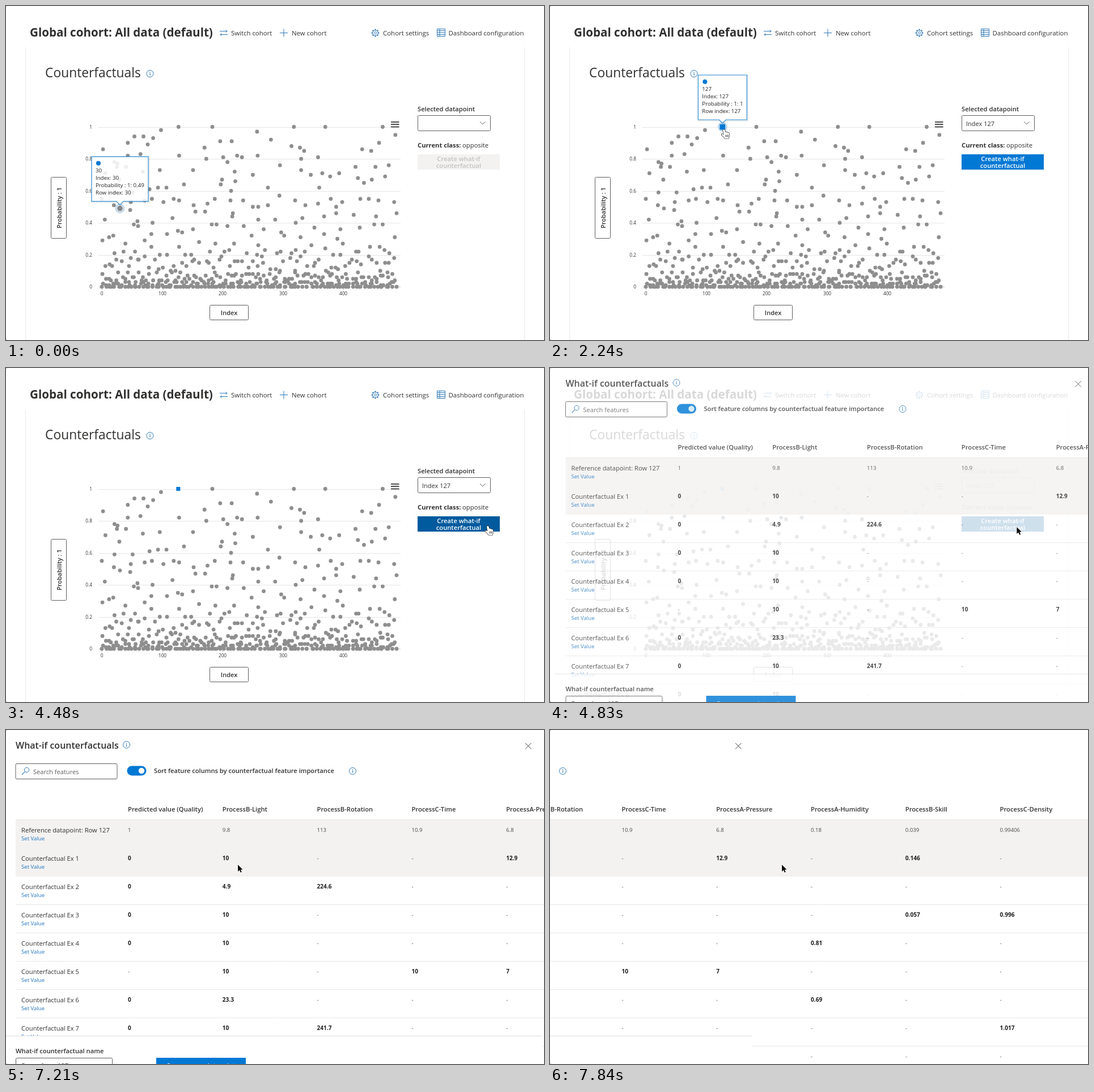
An HTML page with a canvas that plays this animation: 949 by 590 pixels, repeating every 8000 ms.

```html
<!DOCTYPE html>
<html lang="en">
<head>
<meta charset="utf-8">
<title>Counterfactuals</title>
<style>
html, body { margin: 0; width: 100%; height: 100%; overflow: hidden; background: #fff; }
canvas { display: block; width: 949px; height: 590px; }
</style>
</head>
<body>
<canvas id="stage" width="949" height="590"></canvas>
<script>
const ctx = document.getElementById('stage').getContext('2d');
const W = 949, H = 590, LOOP = 8000, STEP = 70;
const INK = '#323130', BLUE = '#0078d4', DOT = '#8e8e8e', ICON = '#2f78b7';

// ---------- helpers ----------
const clamp01 = v => Math.max(0, Math.min(1, v));
const plotX = index => 169 + index * 1.0655;
const plotY = p => 496 - p * 282.5;

function track(keys, t) {
  if (t <= keys[0][0]) return keys[0].slice(1);
  for (let i = 1; i < keys.length; i++) {
    const a = keys[i - 1], b = keys[i];
    if (t <= b[0]) {
      const k = (t - a[0]) / (b[0] - a[0]);
      return a.slice(1).map((v, j) => v + (b[j + 1] - v) * k);
    }
  }
  return keys[keys.length - 1].slice(1);
}

function text(str, x, y, size, { weight = 400, color = INK, align = 'left' } = {}) {
  ctx.font = `${weight} ${size}px "Open Sans", "Noto Sans", sans-serif`;
  ctx.fillStyle = color;
  ctx.textAlign = align;
  ctx.fillText(str, x, y);
}

function fill(x, y, w, h, color) {
  ctx.fillStyle = color;
  ctx.fillRect(x, y, w, h);
}

function frame(x, y, w, h, color = '#605e5c', radius = 2) {
  ctx.beginPath();
  ctx.roundRect(x + .5, y + .5, w, h, radius);
  ctx.strokeStyle = color;
  ctx.lineWidth = 1;
  ctx.stroke();
}

function disc(x, y, r, color) {
  ctx.beginPath();
  ctx.arc(x, y, r, 0, Math.PI * 2);
  ctx.fillStyle = color;
  ctx.fill();
}

function ring(x, y, r, color = ICON, width = 1) {
  ctx.beginPath();
  ctx.arc(x, y, r, 0, Math.PI * 2);
  ctx.strokeStyle = color;
  ctx.lineWidth = width;
  ctx.stroke();
}

function stroke(path, color = ICON, width = 1) {
  ctx.strokeStyle = color;
  ctx.lineWidth = width;
  ctx.stroke(new Path2D(path));
}

function infoIcon(x, y) {
  ring(x, y, 6);
  fill(x - .5, y - 1, 1.1, 4.2, ICON);
  fill(x - .6, y - 3.2, 1.3, 1.3, ICON);
}

// ---------- scatter data ----------
// index, percent: the sparse upper part of the cloud
const upper = [
  127,100, 183,100, 318,100, 370,100, 465,100, 98,98, 257,97, 486,95, 54,94, 69,94,
  85,93, 76,89, 43,90, 280,92, 196,91, 215,91, 459,90, 314,88, 328,87, 335,85,
  170,87, 2,86, 431,86, 446,85, 43,82, 64,83, 128,82, 173,80, 201,81, 224,82,
  232,81, 258,82, 330,80, 358,81, 21,78, 26,77, 208,78, 25,75, 40,75, 295,76,
  420,75, 453,75, 475,76, 68,72, 96,73, 151,73, 220,72, 250,70, 330,73, 346,70,
  365,71, 378,69, 393,71, 424,68, 434,65, 447,67, 469,69, 6,71, 29,67, 199,67,
  197,64, 221,66, 136,64, 79,61, 93,62, 107,62, 214,60, 275,62, 360,62, 21,59,
  51,59, 30,49
];
// lowest percent, highest percent, number of points
const bands = [[50, 57, 27], [40, 48, 18], [30, 39, 26], [20, 29, 38],
  [10, 19, 64], [4, 9, 95], [1, 3, 95], [0, 0, 95]];

let seed = 20;
const random = () => (seed = (seed * 16807) % 2147483647) / 2147483647;

const points = [];
for (let i = 0; i < upper.length; i += 2) points.push({ index: upper[i], p: upper[i + 1] / 100 });
for (const [low, high, count] of bands) {
  for (let i = 0; i < count; i++) {
    const index = Math.floor((i + random()) / count * 489);
    points.push({ index, p: (low + Math.floor(random() * (high - low + 1))) / 100 });
  }
}

// ---------- cursor ----------
const cursorPath = [
  [210, 464, 588], [350, 446, 530], [560, 402, 420], [770, 366, 310], [980, 345, 247],
  [1050, 336, 240], [1260, 315, 227], [1540, 307, 222], [1680, 307, 220], [1750, 307, 218],
  [2940, 307, 218], [3010, 345, 228], [3080, 480, 256], [3150, 680, 280], [3220, 797, 286],
  [3290, 846, 294], [3430, 876, 298], [3570, 860, 288], [3710, 850, 279],
  [4690, 850, 279], [4900, 810, 282], [5180, 660, 270], [5460, 529, 252],
  [5600, 450, 242], [5740, 409, 238]
];

function drawCursor(t, x, y) {
  const hand = (t >= 1120 && t < 2990) || (t >= 3150 && t < 4690);
  ctx.save();
  ctx.translate(x, y);
  ctx.lineJoin = 'round';
  const shape = new Path2D(hand
    ? 'M-2 1 Q0 -1 1.4 1 L2.6 5 Q4 4 5 5.4 Q6.6 4.8 7.3 6 Q9 5.8 9.2 7.4 L9.6 11 Q9.4 13 8.2 14.5 L8 16 L1.2 16 L0 14 L-4.6 9.6 Q-4.8 7.8 -2.8 8 L-.6 9.4 Z'
    : 'M0 0 L0 12 L2.8 9.5 L4.9 13.8 L6.9 12.9 L5 8.8 L8.6 8.6 Z');
  ctx.strokeStyle = hand ? '#111' : '#fff';
  ctx.lineWidth = hand ? 1.2 : 1.6;
  ctx.fillStyle = hand ? '#fff' : '#111';
  ctx.stroke(shape);
  ctx.fill(shape);
  if (hand) stroke('M3 9.5V13.5 M5.2 9.5V13.5 M7.3 9.5V13.5', '#111', .8);
  ctx.restore();
}

// ---------- chart page ----------
function drawHeader() {
  text('Global cohort: All data (default)', 42, 54, 20.6, { weight: 700 });
  stroke('M377 44.5H390 M387.5 42L390 44.5L387.5 47 M391 50.5H378 M380.5 48L378 50.5L380.5 53');
  text('Switch cohort', 397, 52, 11.4);
  stroke('M483 47.5H497 M490 40.5V54.5');
  text('New cohort', 504, 52, 11.4);
  for (let i = 0; i < 8; i++) {
    const a = i * Math.PI / 4, c = Math.cos(a), s = Math.sin(a);
    stroke(`M${651.5 + c * 4.8} ${47.5 + s * 4.8}L${651.5 + c * 6.8} ${47.5 + s * 6.8}`, ICON, 2.2);
  }
  ring(651.5, 47.5, 4.8);
  ring(651.5, 47.5, 2);
  text('Cohort settings', 665, 52, 11.45);
  stroke('M760.5 40.5H774.5V53.5H760.5Z M760.5 43.5H774.5 M760.5 47H774.5 M760.5 50.5H774.5 M765 40.5V53.5');
  text('Dashboard configuration', 780.5, 52, 11.45);
  stroke('M34.5 73V590 M914.5 73V590', '#e8e8e8');
  text('Counterfactuals', 69, 126, 22.8, { weight: 500 });
  infoIcon(254, 119.5);
}

function drawAxes() {
  for (let i = 0; i <= 5; i++) {
    const y = Math.round(plotY(i / 5)) + .5;
    stroke(`M163 ${y}H696`, i ? '#e6e6e6' : '#ccd0d8');
    text(String(i / 5), 152, y + 2.8, 8.3, { align: 'right' });
  }
  for (let i = 0; i < 500; i += 100) {
    const x = Math.round(plotX(i)) + .5;
    stroke(`M${x} 496V502`, '#ccd0d8');
    text(String(i), x - .5, 511, 8.3, { align: 'center' });
  }
  frame(79, 302, 27, 108);
  ctx.save();
  ctx.translate(97.5, 356.5);
  ctx.rotate(-Math.PI / 2);
  text('Probability : 1', 0, 0, 11, { weight: 600, align: 'center' });
  ctx.restore();
  frame(359, 528, 68, 26);
  text('Index', 393.5, 546, 11, { weight: 600, align: 'center' });
}

function drawPoints(t) {
  points.forEach(({ index, p }, i) => {
    if (i || t < 2240) disc(plotX(index), plotY(p), 3.4, DOT);
  });
  const first = 1 - clamp01((t - 140) / 280);
  const second = t < 1050 || t >= 3060 ? 0 : clamp01((t - 980) / 210);
  halo(30, .49, first);
  halo(127, 1, second, t >= 2240);
  halo(486, .95, t >= 3060 && t < 3220 ? .6 : 0);
  if (t >= 2240) fill(plotX(127) - 4, plotY(1) - 3.5, 7, 7, BLUE);
}

function halo(index, p, alpha, square) {
  if (!alpha) return;
  const x = plotX(index), y = plotY(p);
  ctx.save();
  ctx.globalAlpha = alpha;
  disc(x, y, 8, square ? '#b5d7f1' : '#d3e1ec');
  ring(x, y, 7.6, '#a9cbe6');
  if (square) fill(x - 4.7, y - 4.5, 9.4, 9.4, BLUE);
  else disc(x, y, 4.7, '#878787');
  ctx.restore();
}

function drawTooltip(index, p, width, alpha, x = plotX(index), y = plotY(p)) {
  if (alpha <= 0) return;
  const left = x - width / 2, top = y - 91.5, bottom = y - 12.5;
  ctx.save();
  ctx.globalAlpha = alpha;
  const box = new Path2D(`M${left} ${top}H${left + width}V${bottom}H${x + 6}L${x} ${bottom + 6}L${x - 6} ${bottom}H${left}Z`);
  ctx.strokeStyle = 'rgba(0,0,0,.07)';
  ctx.lineWidth = 4;
  ctx.translate(1, 1);
  ctx.stroke(box);
  ctx.translate(-1, -1);
  ctx.fillStyle = 'rgba(255,255,255,.86)';
  ctx.fill(box);
  ctx.strokeStyle = '#2f8fd6';
  ctx.lineWidth = 1.2;
  ctx.stroke(box);
  disc(left + 12, top + 11.7, 4, BLUE);
  [index, `Index: ${index}`, `Probability : 1: ${p}`, `Row index: ${index}`]
    .forEach((line, i) => text(String(line), left + 7, top + 27.8 + i * 12.9, 9.7, { color: '#222' }));
  ctx.restore();
}

function drawTooltips(t) {
  drawTooltip(30, .49, 100, 1 - clamp01((t - 140) / 280));
  if (t >= 1050 && t < 3060) drawTooltip(127, 1, 86, clamp01((t - 980) / 210));
  if (t >= 3060) {
    // the box closes a third of the remaining way every 32 ms
    const n = (t - 3060) / 32;
    const x = plotX(486) + (plotX(127) - plotX(486)) * Math.pow(2 / 3, n);
    const y = plotY(.95) + (plotY(1) - plotY(.95)) * Math.pow(.5, n);
    drawTooltip(486, .95, 100, 1 - clamp01((t - 3710) / 140), x, y);
  }
}

function drawSidebar(t, x, y) {
  const selected = t >= 2240;
  for (const top of [204, 208, 212.5]) fill(679, top, 14.5, 2, '#4a4a4a');
  text('Selected datapoint', 726, 185.5, 11.2, { weight: 600 });
  frame(726, 193, 128, 27);
  stroke('M836 204.5L840.7 209L845.5 204.5', '#605e5c');
  if (selected) text('Index 127', 734, 212, 11);
  text('Current class:', 726, 250, 11.2, { weight: 700 });
  text('opposite', 805, 250, 11.3);
  const over = x >= 726 && x <= 871 && y >= 262 && y <= 289;
  const back = !selected ? '#f3f2f1' : t >= 4480 ? '#005a9e' : over ? '#106ebe' : BLUE;
  fill(726, 262, 145, 27, back);
  const style = { weight: 600, align: 'center', color: selected ? '#fff' : '#c4c2c0' };
  text('Create what-if', 798.5, 274, 11.2, style);
  text('counterfactual', 798.5, 286, 11.2, style);
}

// ---------- what-if panel ----------
const columns = ['Predicted value (Quality)', 'ProcessB-Light', 'ProcessB-Rotation', 'ProcessC-Time',
  'ProcessA-Pressure', 'ProcessA-Humidity', 'ProcessB-Skill', 'ProcessC-Density'];
const rows = [
  '1 9.8 113 10.9 6.8 0.18 0.039 0.99406',
  '0 10 - - 12.9 - 0.146 -',
  '0 4.9 224.6 - - - - -',
  '0 10 - - - - 0.057 0.996',
  '0 10 - - - 0.81 - -',
  '- 10 - 10 7 - - -',
  '0 23.3 - - - 0.69 - -',
  '0 10 241.7 - - - - 1.017',
  '0 10 - - - - - -'
].map(row => row.split(' '));
const columnX = i => 218 + i * 166.8;

const scrollPath = [[7140, 0], [7210, 3], [7280, 11], [7350, 30], [7420, 59], [7490, 110],
  [7560, 184], [7630, 280], [7700, 386], [7770, 492], [7840, 592]];

function drawTable() {
  fill(20, 159, 1700, 100, '#f3f2f1');
  stroke('M20 158.5H1720', '#e6e4e2');
  columns.forEach((name, i) => text(name, columnX(i), 144, 11.2, { weight: 600 }));
  rows.forEach((cells, r) => {
    const y = r * 50;
    if (r > 1) stroke(`M20 ${y + 208.5}H1720`, '#e9e8e6');
    text(r ? `Counterfactual Ex ${r}` : 'Reference datapoint: Row 127', 30, y + 181.3, 11.2);
    text('Set Value', 30, y + 195.3, 9.6, { color: '#1f72bd' });
    cells.forEach((cell, c) => {
      const changed = r > 0 && cell !== '-';
      text(cell, columnX(c), y + 179.6, changed ? 10.1 : 9.6,
        { weight: changed ? 700 : 400, color: changed ? '#201f1e' : '#484644' });
    });
  });
}

function drawFooter() {
  fill(0, 540, W, 50, '#fff');
  stroke(`M0 540.5H${W}`, '#e1dfdd');
  text('What-if counterfactual name', 20, 571, 11.2, { weight: 600 });
  frame(20, 579, 170, 27);
  text('Copy of row 127', 29, 597, 11.2);
  fill(268, 579, 158, 28, BLUE);
  text('Save as new datapoint', 347, 597, 11.2, { weight: 600, color: '#fff', align: 'center' });
}

function drawPanel(t) {
  const p = clamp01((t - 4650) / 420);
  const ease = 1 - Math.pow(1 - p, 3);
  ctx.save();
  ctx.globalAlpha = ease;
  fill(0, 0, W, H, '#fff');
  ctx.translate(40 * (1 - ease) - track(scrollPath, t)[0], 0);

  text('What-if counterfactuals', 20, 33, 16, { weight: 600 });
  infoIcon(215.5, 26);
  stroke('M919 23L929.5 33.5 M929.5 23L919 33.5', '#484644');
  frame(19.5, 59, 179, 27);
  ring(39.5, 70.5, 4.2);
  stroke('M36.5 73.7L31 79', ICON, 1.1);
  text('Search features', 51, 77.5, 11.1, { color: '#605e5c' });
  ctx.beginPath();
  ctx.roundRect(216.5, 63.5, 34, 17, 8.5);
  ctx.fillStyle = BLUE;
  ctx.fill();
  disc(242, 72, 5.2, '#fff');
  text('Sort feature columns by counterfactual feature importance', 264, 76.3, 11.15, { weight: 600 });
  infoIcon(614.5, 72.5);

  drawTable();
  drawFooter();
  ctx.restore();
}

// ---------- main loop ----------
function render(time) {
  const t = Math.floor((time % LOOP) / STEP) * STEP;
  const [x, y] = track(cursorPath, t);
  fill(0, 0, W, H, '#fff');
  if (t < 5110) {
    drawHeader();
    drawAxes();
    drawPoints(t);
    drawTooltips(t);
    drawSidebar(t, x, y);
  }
  if (t >= 4690) drawPanel(t);
  fill(0, 0, 1, 1, '#777');
  fill(0, H - 1, 1, 1, '#777');
  if (t >= 210) drawCursor(t, x, y);
}

let start;
function tick(now) {
  start ??= now;
  render(now - start);
  requestAnimationFrame(tick);
}
requestAnimationFrame(tick);
</script>
</body>
</html>
```
